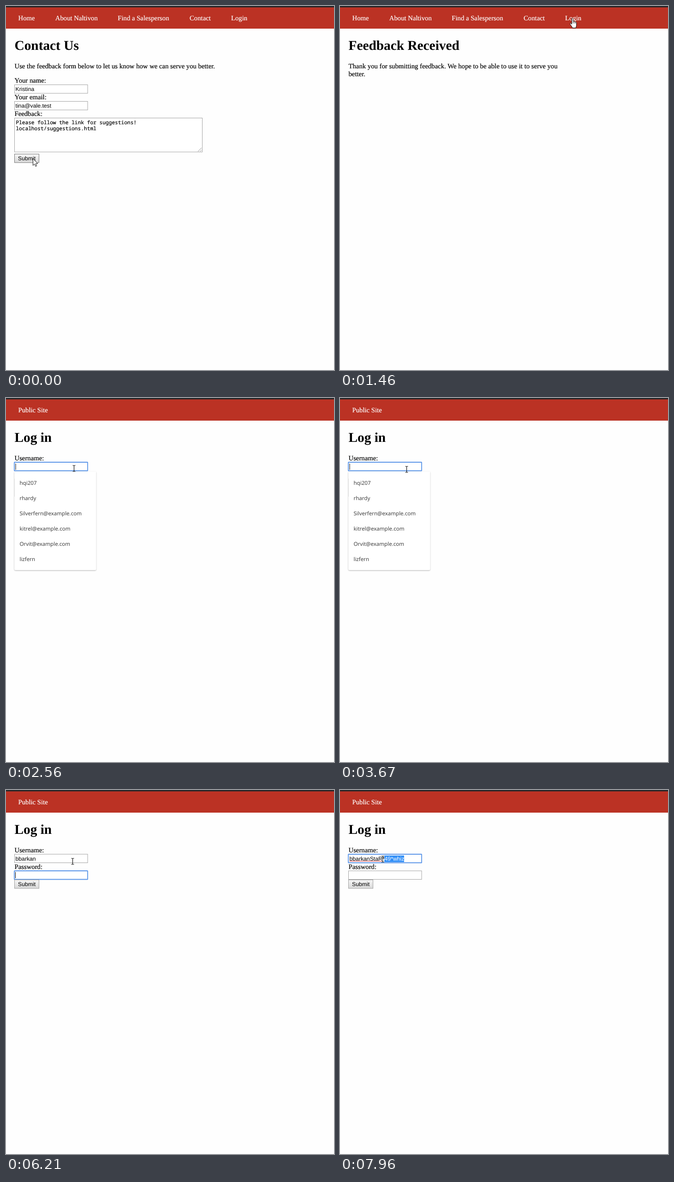
An HTML page for the animation above (8000 ms loop, 711 by 788 pixels).

```html
<!DOCTYPE html>
<html lang="en">
<head>
<meta charset="utf-8">
<title>Feedback and log in</title>
<style>
  html, body { margin: 0; width: 100%; height: 100%; overflow: hidden; background: #fefefe; }
  svg { display: block; width: 711px; height: 788px; }
  text { white-space: pre; text-rendering: geometricPrecision; fill: currentColor; }
  .serif, .mono { stroke: currentColor; stroke-width: .2; }
  .serif { font: 14.72px "Liberation Serif", serif; }
  .head { font: bold 29.33px "Liberation Serif", serif; }
  .sans { font: 12.22px "Liberation Sans", sans-serif; }
  .mono { font: 11.2px "Noto Sans Mono", monospace; }
  .menu { font: 11.6px "Open Sans", sans-serif; }
</style>
</head>
<body>
<svg id="stage" viewBox="0 0 711 788" xmlns="http://www.w3.org/2000/svg">
  <defs>
    <linearGradient id="btn" x2="0" y2="1">
      <stop stop-color="#f6f6f6"/><stop offset="1" stop-color="#d9d9d9"/>
    </linearGradient>
    <filter id="shade" x="-10%" y="-10%" width="120%" height="130%">
      <feDropShadow dx="0" dy="1" stdDeviation="1.1" flood-color="#000" flood-opacity=".38"/>
    </filter>
    <g id="arrow">
      <path d="M.5 .5V15.2L3.9 12L6.1 17.2L8.5 16.2L6.3 11.2H10.8Z" fill="#fff" stroke="#111" stroke-linejoin="round"/>
    </g>
    <g id="hand">
      <path d="M4.4 13.5V2.2C4.4 .2 7.2 .2 7.2 2.2V7.5C8 6.4 9.7 6.7 9.8 8C10.7 7.2 12.1 7.6 12.3 8.8C13.4 8.3 14.6 9 14.6 10.4V15.5C14.6 18 13.2 18.8 13.2 21.5H5.8C5.6 18.6 1.4 15.4 .8 12.8C.4 11.2 2.4 10.6 3.2 11.8Z" fill="#fff" stroke="#111" stroke-linejoin="round"/>
      <path d="M7.2 8V11.5M9.8 8.5V11.5M12.3 9.2V11.8" stroke="#111" stroke-width=".9"/>
    </g>
    <g id="beam">
      <path d="M-3 -6.5H-1L0 -5.7L1 -6.5H3M0 -6V6M-3 6.5H-1L0 5.7L1 6.5H3" fill="none" stroke="#111" stroke-width="1.2"/>
    </g>
  </defs>
  <rect width="711" height="788" fill="#fefefe"/>
  <rect width="711" height="49" fill="#bb3224"/>
  <rect width="711" height="3" fill="#2b2729"/>
  <g id="page"></g>
  <use id="pointer"/>
</svg>
<script>
const LOOP = 8000;
const USER = "bbarkan", SECRET = "StaR*49*whiz";
const LOGINS = ["hqi207", "rhardy", "Silverfern@example.com", "kitrel@example.com", "Orvit@example.com", "lizfern"];
const page = document.getElementById("page");
const pointer = document.getElementById("pointer");

const pen = document.createElement("canvas").getContext("2d");
pen.font = '12.22px "Liberation Sans", sans-serif';
const width = s => pen.measureText(s).width;

// Each step holds until the next: [start, value, ...]
const pointers = [
  [0, "arrow", 58, 330], [680, "arrow", 150, 262], [800, "arrow", 424, 100],
  [1080, "arrow", 466, 58], [1230, "hand", 490, 30], [1380, "hand", 498, 26],
  [1530, "hand", 502, 23], [1680, "hand", 499.5, 22.5], [1980, "arrow", 420, 49],
  [2130, "arrow", 300, 88], [2270, "arrow", 196, 128], [2420, "beam", 149, 150],
  [2560, "beam", 147.5, 152.5], [2960, "beam", 144.5, 154.5], [7180, "beam", 151, 184],
  [7330, "beam", 150, 168], [7450, "beam", 140, 150], [7580, "beam", 123, 149],
  [7700, "beam", 110, 149], [7830, "beam", 101, 149], [7960, "beam", 92.7, 149.5]
];
const typedUser = [[0, 0], [4100, 1], [4410, 2], [4680, 3], [4820, 4], [4960, 5], [5100, 7]];
const typedSecret = [[0, 0], [6600, 2], [6750, 5], [6900, 8], [7040, 12]];
const selectFrom = [[0, 19], [7580, 16], [7700, 14], [7830, 13], [7960, 12]];
const focus = [[0, ""], [2560, "user"], [5230, "pass"], [6460, "user"]];
const carets = [[0, 0], [2560, 1], [3110, 0], [3670, 1], [5660, 0], [6210, 1], [7580, 0]];
const menus = [[0, ""], [2560, "all"], [4100, "one"], [5230, ""]];
const pages = [[0, "contact"], [560, "thanks"], [1830, "login"]];

const at = (steps, t) => steps.filter(s => s[0] <= t).pop().slice(1);
const now = (steps, t) => at(steps, t)[0];

const text = (x, y, s, cls = "serif", color = "#000") =>
  `<text x="${x}" y="${y}" class="${cls}" color="${color}">${s}</text>`;
const box = (x, y, w, h, fill, extra = "") =>
  `<rect x="${x}" y="${y}" width="${w}" height="${h}" fill="${fill}" ${extra}/>`;
const nav = items => items.map(([x, s]) => text(x, 31, s, "serif", "#fff")).join("");
const title = s => text(18.5, 94.7, s, "head");

function field(y, content = "", focused = false) {
  const frame = focused
    ? box(18, y, 159, 18.5, "#fff", 'stroke="#5b95e8" stroke-width="1.8" rx=".6"')
    : box(18.5, y, 158.5, 18.5, "#fff", 'stroke="#a3a3a3"');
  return frame + content;
}

const button = (y, edge = "#a0a0a0") =>
  box(18.5, y, 53, 18.5, "url(#btn)", `stroke="${edge}"`) + text(26, y + 13.2, "Submit", "sans");

const caret = (x, y) => box(x, y, 1, 13.5, "#000");

function menu(kind) {
  if (!kind) return "";
  const items = kind === "all" ? LOGINS : [USER];
  const [w, h] = kind === "all" ? [177, 213.5] : [159.5, 48.3];
  return box(18.3, 159, w, h, "#fff", 'rx="2" filter="url(#shade)"') +
    items.map((s, i) => text(29.5, 187.5 + i * 33.1, s, "menu", "#333")).join("");
}

const mainNav = nav([[26.5, "Home"], [106.8, "About Naltivon"], [242.3, "Find a Salesperson"], [398, "Contact"], [488, "Login"]]);

const draw = {
  contact: () => mainNav + title("Contact Us") +
    text(18.5, 135, "Use the feedback form below to let us know how we can serve you better.") +
    text(18.5, 166, "Your name:") + field(170.5, text(20.5, 184.2, "Kristina", "sans")) +
    text(18.5, 202, "Your email:") + field(206.5, text(20.5, 220, "tina@vale.test", "sans")) +
    text(18.5, 238, "Feedback:") + box(18.5, 242.5, 407, 73.5, "#fff", 'stroke="#a3a3a3"') +
    text(21.3, 255.6, "Please follow the link for suggestions!", "mono") +
    text(21.3, 269.3, "localhost/suggestions.html", "mono") +
    '<path d="M416 315L424 307M420.5 315L424 311.5" stroke="#888" stroke-width=".9"/>' + button(320.5, "#777"),

  thanks: () => mainNav + title("Feedback Received") +
    text(18.5, 135, "Thank you for submitting feedback. We hope to be able to use it to serve you") +
    text(18.5, 151.8, "better."),

  login(t) {
    const value = USER.slice(0, now(typedUser, t)) + SECRET.slice(0, now(typedSecret, t));
    const cut = now(selectFrom, t), active = now(focus, t);
    const plain = value.slice(0, cut), picked = value.slice(cut);
    const x = 20.5, cutX = x + width(plain);
    let inner = text(x, 152.8, plain, "sans");
    if (picked) inner += box(cutX - .4, 141.7, width(picked), 14.3, "#3390f8") + text(cutX, 152.8, picked, "sans", "#fff");
    if (value.includes("*")) {
      const count = Math.floor(width(USER + "StaR") / 2);
      inner += `<path d="M${x} 155${"l1 -1.5l1 1.5".repeat(count)}" fill="none" stroke="#e33" stroke-width=".8"/>`;
    }
    let bar = "";
    if (now(carets, t)) bar = active === "user" ? caret(cutX, 142) : active === "pass" ? caret(20, 177.5) : "";
    return nav([[26.5, "Public Site"]]) + title("Log in") +
      text(18.5, 135, "Username:") + field(139, inner, active === "user") +
      text(18.5, 171, "Password:") + field(175, "", active === "pass") +
      button(194.5) + bar + menu(now(menus, t));
  }
};

let shown = "";
function render(t) {
  const markup = draw[now(pages, t)](t);
  if (markup !== shown) page.innerHTML = shown = markup;
  const [shape, x, y] = at(pointers, t);
  pointer.setAttribute("href", "#" + shape);
  pointer.setAttribute("transform", `translate(${x} ${y})`);
}

const start = performance.now();
function tick() {
  render((performance.now() - start) % LOOP);
  requestAnimationFrame(tick);
}
tick();
</script>
</body>
</html>
```
